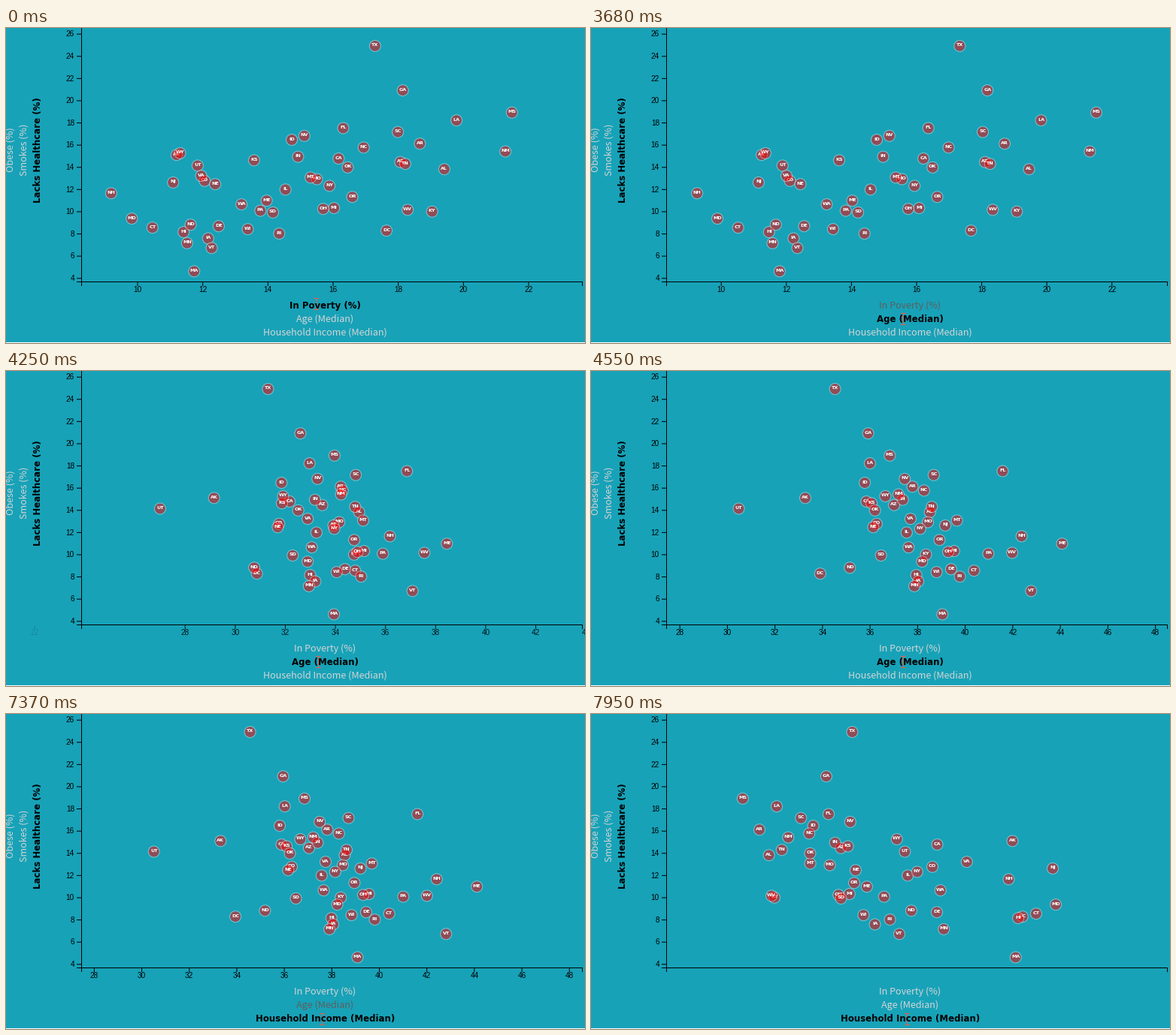
Write a matplotlib script that moves like this. It is 770x420 px and loops after 8 s.

```python
import matplotlib.pyplot as plt
import numpy as np
from matplotlib.animation import FuncAnimation
from matplotlib.patches import Circle, Polygon

W, H, DPI = 770, 420, 100
STEP, LOOP = 40, 8000
PX = 72 / DPI
LEFT, SPAN, BASE, UNIT = 100, 666, 338, 14.8
TEAL, PALE, BEAM = "#17a2b8", "#d3d3d3", "#e85d47"

HOVERS, CLICKS = (2310, 5290), (3680, 7370)
LAGS = (90, 62)   # how far each glide has run at its first visible step
TICK = 145        # the screen refreshes in steps of this many ms

TITLES = ["In Poverty (%)", "Age (Median)", "Household Income (Median)"]


def spread(order, curve):
    """Place states, ranked low to high, along a curve through a few (rank, value) points."""
    names = order.split()
    values = np.interp(range(len(names)), *zip(*curve))
    return np.array([v for _, v in sorted(zip(names, values))])


POVERTY_RANK = ("NH MD CT NJ AK WY HI MN ND MA UT VA CO IA VT NE DE WA WI KS PA ME SD RI IL ID "
                "IN NV MT MO OH NY MI CA FL OK OR NC TX DC SC AZ GA TN WV AR KY AL LA NM MS")
AGE_RANK = ("UT AK DC TX ND ID CA GA LA KS NE OK CO SD WY MS AZ NM IN NV IL WA VA AR MN HI "
            "IA NY MD NC KY MO AL TN SC WI OR MA NJ OH DE MI MT RI CT PA FL WV NH VT ME")
INCOME_RANK = ("MS WV AR AL KY TN LA NM SC MT NC FL OK ID MO OH GA IN ME MI AZ SD OR NV KS WI "
               "NE TX PA IA VT RI WY IL NY ND DE UT CO WA MN CA VA NH MA HI CT AK DC NJ MD")
UNINSURED_RANK = ("MA VT MN IA RI HI DC WI CT DE ND MD SD KY PA WV OH MI WA ME OR NH IL NY NE NJ "
                  "CO MO MT VA AL OK UT TN AZ KS CA IN AK WY NM NC AR ID NV SC FL LA MS GA TX")

METRICS = [
    spread(POVERTY_RANK, [(0, 9.2), (3, 11.1), (16, 12.5), (17, 13.2), (31, 15.9), (36, 16.6),
                          (40, 18), (44, 18.3), (48, 19.8), (49, 21.3), (50, 21.5)]),
    spread(AGE_RANK, [(0, 30.5), (1, 33.3), (5, 35.8), (12, 36.3), (18, 37.4), (34, 38.7),
                      (43, 39.8), (46, 41.6), (49, 42.8), (50, 44.1)]),
    1000 * spread(INCOME_RANK, [(0, 39.7), (8, 45.3), (15, 49.2), (23, 51.4), (31, 54.7),
                                (32, 57), (37, 60.9), (41, 61.9), (44, 69.1), (50, 74)])]
UNINSURED = spread(UNINSURED_RANK, [(0, 4.6), (1, 6.7), (4, 8), (10, 8.8), (12, 9.9), (17, 10.3),
                                    (23, 12.3), (29, 13.2), (30, 13.8), (40, 15.4), (46, 17.5),
                                    (48, 18.9), (49, 20.9), (50, 24.9)])
TICKS = [range(10, 23, 2), range(28, 49, 2), range(40000, 80001, 5000)]

POINTER = [(0, "beam", 412.5, 368), (650, "beam", 411.5, 376), (2310, "hand", 412.5, 381),
           (2460, "hand", 415.5, 387), (3680, "beam", 415.5, 388), (5290, "hand", 420, 406),
           (7370, "beam", 420.5, 407)]
HAND = np.array([(-1, 0), (1, 0), (1.7, 5.5), (7, 6), (10.3, 8.5), (10.3, 15), (8.8, 23.3),
                 (-.2, 23.3), (-.2, 20.5), (-6.2, 12), (-5.5, 10), (-1.7, 12.7), (-1.7, 1)])


def refresh(ms, start):
    """Number of screen refreshes since start, negative before it."""
    return (ms - start) // TICK


def fade(ms, start):
    n = refresh(ms, start)
    return min(1, .45 + .35 * n) if n >= 0 else 0


def glide(ms):
    """Metric shown, metric moved to, and the eased share of the way."""
    view = sum(ms >= c for c in CLICKS)
    if view == 0:
        return 0, 0, 0
    t = (LAGS[view - 1] + TICK * refresh(ms, CLICKS[view - 1])) / 1000
    if t >= 1:
        return view, view, 0
    return view - 1, view, 4 * t ** 3 if t < .5 else 1 - 4 * (1 - t) ** 3


def scale_x(metric, value):
    lo, hi = METRICS[metric].min() * .9, METRICS[metric].max() * 1.1
    return LEFT + (value - lo) / (hi - lo) * SPAN


def scale_y(value):
    return BASE - (value - 3.68) * UNIT


fig = plt.figure(figsize=(W / DPI, H / DPI), dpi=DPI, facecolor=TEAL)
ax = fig.add_axes([0, 0, 1, 1])
ax.set_xlim(0, W)
ax.set_ylim(H, 0)
ax.axis("off")
ax.axhspan(H - 1, H, color="w", lw=0, zorder=99)


def line(xs, ys, color="k", z=2):
    return ax.plot(xs, ys, color=color, lw=PX, zorder=z, snap=False,
                   solid_capstyle="butt", solid_joinstyle="miter")[0]


def text(x, y, s, size, font="Liberation Sans", **kw):
    kw = {"ha": "center", "va": "baseline", "color": "k", "zorder": 3, **kw}
    return ax.text(x, y, s, fontsize=size * PX, family=font, **kw)


def style(label, bold, color):
    label.set_family("DejaVu Sans" if bold else "Noto Sans CJK JP")
    label.set_fontweight("bold" if bold else "normal")
    label.set_fontsize((11.8 if bold else 12.6) * PX)
    label.set_color(color)


# Axes
line([LEFT + .5] * 2 + [LEFT + SPAN + .5] * 2, [BASE + 6, BASE + .5, BASE + .5, BASE + 6])
line([LEFT - 6, LEFT + .5, LEFT + .5], [BASE + .5, BASE + .5, -5])
for v in range(4, 27, 2):
    y = scale_y(v) + .5
    line([LEFT - 6, LEFT], [y, y])
    text(LEFT - 9, y + 3.3, str(v), 10, ha="right")
tick_pool = [(line([0, 0], [BASE + 1, BASE + 6]), text(0, 352, "", 10)) for _ in range(20)]

# Axis titles
for i, s in enumerate(["Obese (%)", "Smokes (%)", "Lacks Healthcare (%)"]):
    side = text(10 + 18 * i, 162.5, s, 12, rotation=90, rotation_mode="anchor")
    style(side, i == 2, "k" if i == 2 else PALE)
titles = [text(424.3, 374 + 18 * i, s, 12, zorder=80) for i, s in enumerate(TITLES)]

# Bubbles: each label sits on its own circle, below later circles
bubbles = []
rows = scale_y(UNINSURED)
for i, (name, y) in enumerate(zip(sorted(POVERTY_RANK.split()), rows)):
    z = 10 + i
    disc = ax.add_patch(Circle((0, y), 7, fc=(1, 0, 0, .53), lw=0, zorder=z))
    ring = ax.add_patch(Circle((0, y), 7.5, fc="none", ec=(.89, .89, .89, .5), lw=PX, zorder=z))
    tag = text(0, y + .5, name, 6.4, "DejaVu Sans", weight="bold", color="w", zorder=z)
    bubbles.append((disc, ring, tag))

# Pointer
beam = [line([], [], BEAM, 79) for _ in range(3)]
hand = ax.add_patch(Polygon(HAND, fc="w", ec="k", lw=PX, zorder=90))
creases = [line([], [], "k", 91) for _ in range(3)]


def draw_pointer(kind, x, y):
    for part in beam:
        part.set_visible(kind == "beam")
    for part in [hand, *creases]:
        part.set_visible(kind == "hand")
    beam[0].set_data([x, x], [y - 7, y + 7])
    for serif, dy in zip(beam[1:], (-7.5, 7.5)):
        serif.set_data([x - 3.5, x + 3.5], [y + dy] * 2)
    hand.set_xy(HAND + (x, y))
    for i, crease in enumerate(creases):
        crease.set_data([x + 1.7 + 3 * i] * 2, [y + 5.5 + i, y + 11.5])


def draw_ticks(a, b, e):
    groups = [(a, 1.0)] if a == b else [(a, 1 - e), (b, e)]
    marks = [(v, alpha) for m, alpha in groups for v in TICKS[m]]
    for i, (mark, label) in enumerate(tick_pool):
        shown = False
        if i < len(marks):
            v, alpha = marks[i]
            x = (1 - e) * scale_x(a, v) + e * scale_x(b, v) + .5
            shown = -20 < x < W + 20
        mark.set_visible(shown)
        label.set_visible(shown)
        if shown:
            mark.set_xdata([x, x])
            label.set_x(x)
            label.set_text(str(v))
            mark.set_alpha(alpha)
            label.set_alpha(alpha)


def update(k):
    ms = k * STEP + 30
    a, b, e = glide(ms)
    xs = (1 - e) * scale_x(a, METRICS[a]) + e * scale_x(b, METRICS[b])
    for (disc, ring, tag), x, y in zip(bubbles, xs, rows):
        disc.set_center((x, y))
        ring.set_center((x, y))
        tag.set_x(x)
    draw_ticks(a, b, e)
    # Titles darken on hover and pale again when another one is clicked
    shades = [fade(ms, CLICKS[0]),
              1 - fade(ms, HOVERS[0]) + fade(ms, CLICKS[1]),
              1 - fade(ms, HOVERS[1])]
    for i, (title, shade) in enumerate(zip(titles, shades)):
        style(title, i == b, (shade * .83,) * 3)
    draw_pointer(*[p for p in POINTER if p[0] <= ms][-1][1:])
    return []


anim = FuncAnimation(fig, update, frames=LOOP // STEP, interval=STEP, repeat=True,
                     repeat_delay=0, cache_frame_data=False)
plt.show()
```
